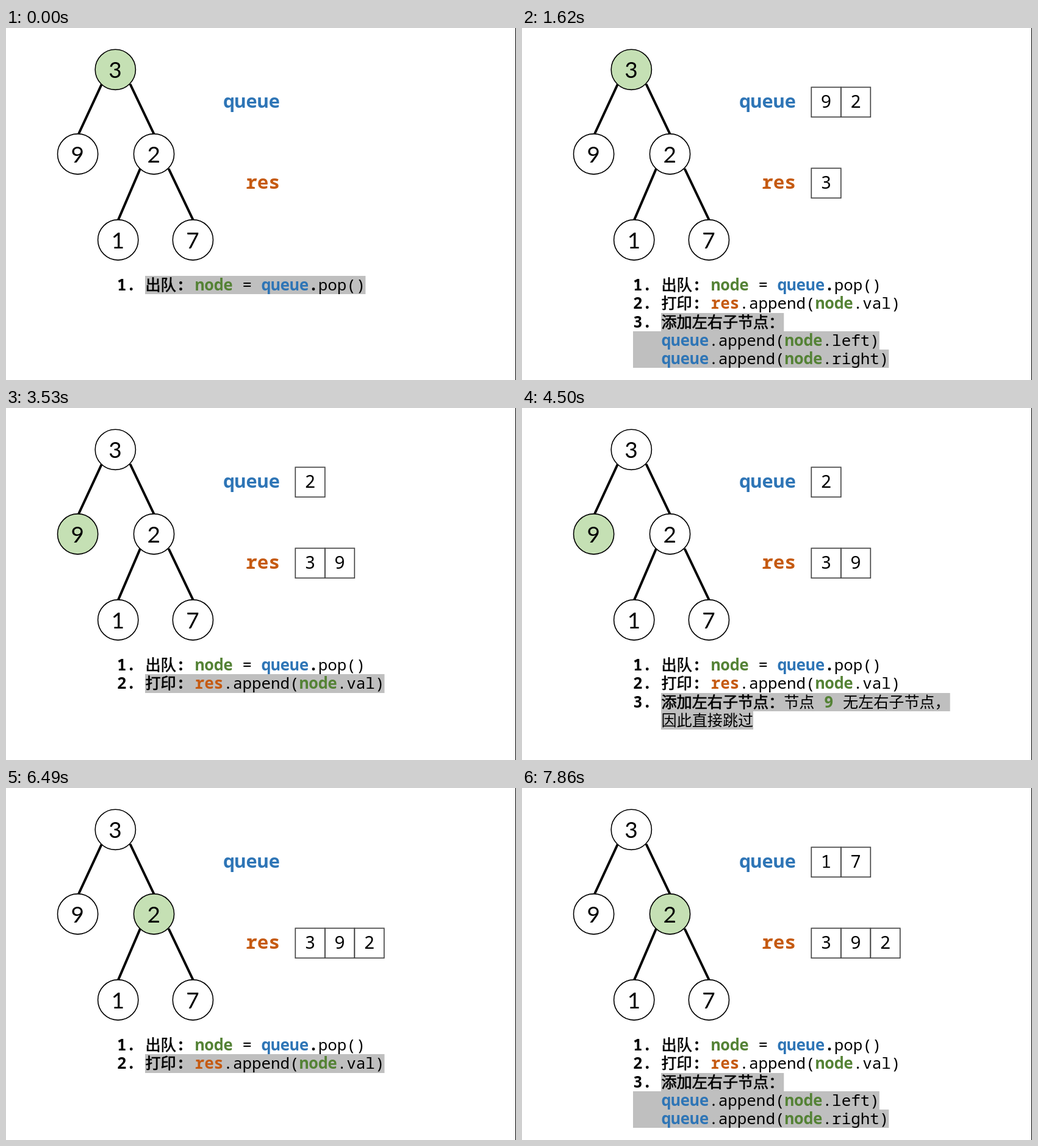
An HTML page with a canvas for the animation above (8 s loop, 836x578 px).

```html
<!DOCTYPE html>
<html lang="zh-CN">
<head>
<meta charset="utf-8">
<style>
  html, body { margin: 0; width: 100%; height: 100%; overflow: hidden; background: #fff; }
  canvas { display: block; width: 836px; height: 578px; }
</style>
</head>
<body>
<canvas id="stage" width="836" height="578"></canvas>
<script>
const ctx = document.getElementById('stage').getContext('2d');
const LOOP = 8000;
const MONO = '"Noto Sans Mono", monospace';
const HAN = '"Noto Sans CJK SC", "Noto Sans CJK", sans-serif';
const BLUE = '#2e75b6', ORANGE = '#c55a11', GREEN = '#548235';
const LEFT = 182, INDENT = 228.5, TOP = 407, PITCH = 30.25;

const tree = [[3, 179.3, 68.3], [9, 117.6, 207], [2, 242.5, 207], [1, 183.7, 348], [7, 306.4, 348]];
const edges = [[157, 92, 119, 174], [203.5, 92, 242.5, 174], [220, 231, 184, 315], [266.6, 231, 306.6, 315]];

// Text runs: [text, bold, colour]
const bold = t => [t, true, '#000'];
const plain = t => [t, false, '#000'];
const queue = ['queue', true, BLUE], res = ['res', true, ORANGE], node = ['node', true, GREEN];

const pop = { no: 1, runs: [bold('出队'), bold(': '), node, plain(' = '), queue, bold('.'), plain('pop()')] };
const print = { no: 2, runs: [bold('打印'), bold(': '), res, plain('.append('), node, plain('.val)')] };
const push = side => ({ wide: true, runs: [queue, plain('.append('), node, plain(`.${side})`)] });
const addBoth = [{ no: 3, runs: [bold('添加左右子节点：')] }, push('left'), push('right')];
const skip = [
  { no: 3, runs: [bold('添加左右子节点：'), plain('节点'), [' 9 ', true, GREEN], plain('无左右子节点，')] },
  { runs: [plain('因此直接跳过')] }
];

// Lines from index `mark` onwards are highlighted
const scenes = [
  { at: 0, active: 3, queue: [], res: [], lines: [pop], mark: 0 },
  { at: 530, active: 3, queue: [], res: [3], lines: [pop, print], mark: 1 },
  { at: 1500, active: 3, queue: [9, 2], res: [3], lines: [pop, print, ...addBoth], mark: 2 },
  { at: 2510, active: 9, queue: [2], res: [3], lines: [pop], mark: 0 },
  { at: 3530, active: 9, queue: [2], res: [3, 9], lines: [pop, print], mark: 1 },
  { at: 4500, active: 9, queue: [2], res: [3, 9], lines: [pop, print, ...skip], mark: 2 },
  { at: 5510, active: 2, queue: [], res: [3, 9], lines: [pop], mark: 0 },
  { at: 6490, active: 2, queue: [], res: [3, 9, 2], lines: [pop, print], mark: 1 },
  { at: 7540, active: 2, queue: [1, 7], res: [3, 9, 2], lines: [pop, print, ...addBoth], mark: 2 }
];

function text(str, x, y, font, color = '#000', align = 'left') {
  ctx.font = font;
  ctx.fillStyle = color;
  ctx.textAlign = align;
  ctx.fillText(str, x, y);
}

const isHan = str => /[\u4e00-\u9fff]/.test(str);

function runFont([str, isBold]) {
  if (isHan(str)) return `${isBold ? 400 : 300} 25.1px ${HAN}`;
  return `${isBold ? 'bold ' : ''}25.9px ${MONO}`;
}

function runWidth(run) {
  ctx.font = runFont(run);
  return ctx.measureText(run[0]).width;
}

function drawRun(run, x, y) {
  const [str, isBold, color] = run;
  text(str, x, y, runFont(run), color);
  // A thin outline gives the Chinese headings a medium weight
  if (isBold && isHan(str)) {
    ctx.strokeStyle = color;
    ctx.lineWidth = 0.7;
    ctx.strokeText(str, x, y);
  }
}

function drawTree(active) {
  ctx.strokeStyle = '#000';
  ctx.lineWidth = 4;
  for (const [x1, y1, x2, y2] of edges) {
    ctx.beginPath();
    ctx.moveTo(x1, y1);
    ctx.lineTo(x2, y2);
    ctx.stroke();
  }
  ctx.lineWidth = 1.6;
  for (const [value, x, y] of tree) {
    ctx.beginPath();
    ctx.arc(x, y, 33.1, 0, Math.PI * 2);
    ctx.fillStyle = value === active ? '#c5e0b4' : '#fff';
    ctx.fill();
    ctx.stroke();
    text(value, x - 0.3, y + 13.7, '37px Lato, sans-serif', '#000', 'center');
  }
}

function drawList([name, , color], values, top) {
  text(name, 449, top + 33.5, `bold 31px ${MONO}`, color, 'right');
  ctx.strokeStyle = '#484848';
  ctx.lineWidth = 1.7;
  values.forEach((value, i) => {
    const x = 474.3 + i * 48.5;
    ctx.strokeRect(x, top + 0.3, 48.5, 48.9);
    text(value, x + 24.2, top + 34, `29px ${MONO}`, '#000', 'center');
  });
}

function drawLine({ no, runs, wide }, row, marked) {
  const top = TOP + row * PITCH, base = top + 24;
  if (marked) {
    const start = wide ? LEFT : INDENT - 0.5;
    const end = INDENT + runs.reduce((sum, run) => sum + runWidth(run), 0);
    const y = Math.round(top);
    ctx.fillStyle = '#bfbfbf';
    ctx.fillRect(start, y, end - start, Math.round(top + PITCH) - y);
  }
  if (no) text(`${no}.`, LEFT, base, `bold 25.9px ${MONO}`);
  let x = INDENT;
  for (const run of runs) {
    drawRun(run, x, base);
    x += runWidth(run);
  }
}

function draw(time) {
  const scene = scenes.findLast(s => s.at <= time);
  ctx.fillStyle = '#fff';
  ctx.fillRect(0, 0, 836, 578);
  ctx.fillStyle = '#000';
  ctx.fillRect(835, 0, 1, 578);
  drawTree(scene.active);
  drawList(queue, scene.queue, 97);
  drawList(res, scene.res, 230);
  scene.lines.forEach((line, i) => drawLine(line, i, i >= scene.mark));
}

const begin = performance.now();
function tick() {
  draw((performance.now() - begin) % LOOP);
  requestAnimationFrame(tick);
}
tick();
</script>
</body>
</html>
```
